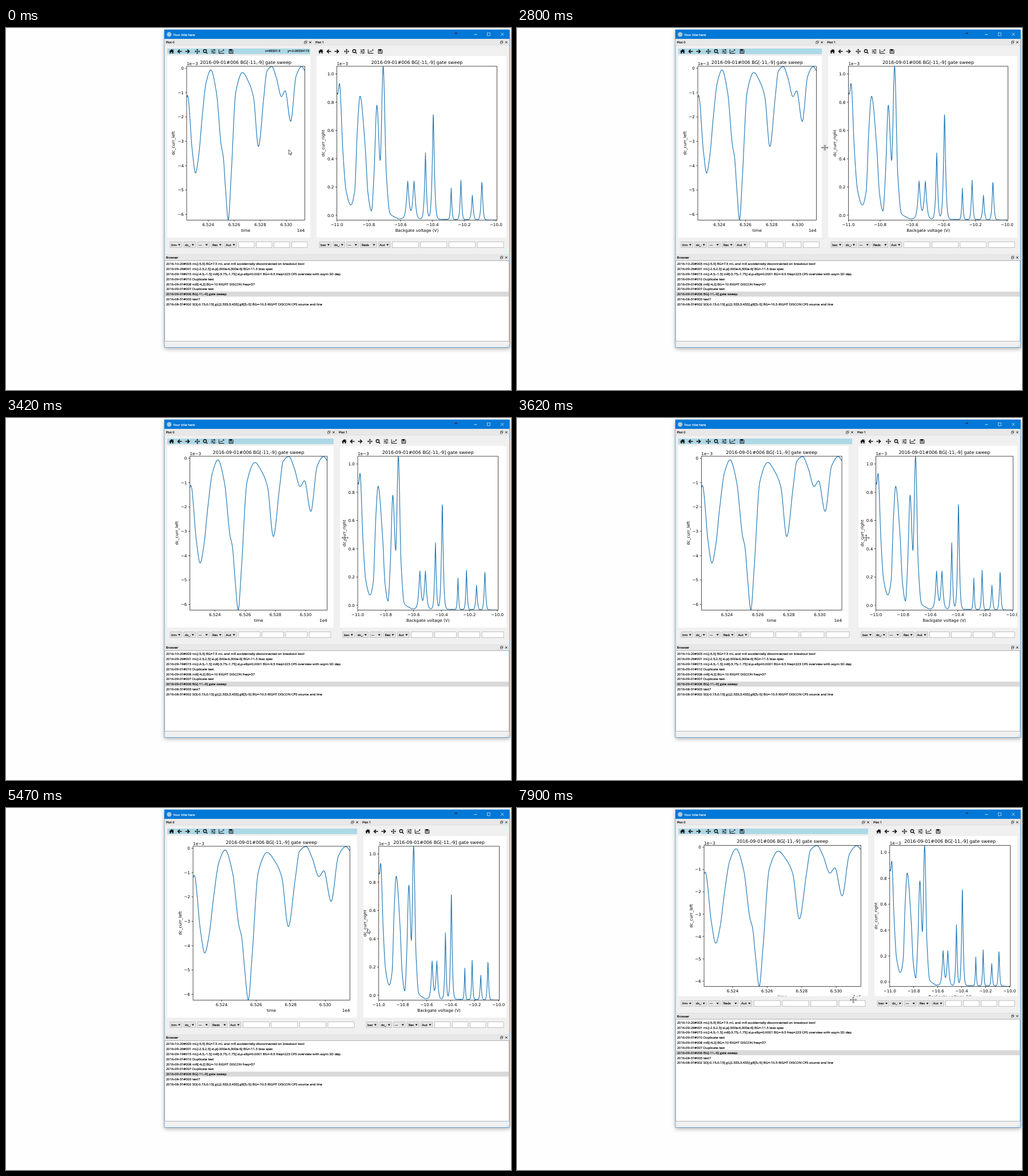
Recreate the animation shown at these times as an HTML page with a canvas. Size 883 px wide and 634 px high, loop 8000 ms.

```html
<!DOCTYPE html>
<html lang="en">
<head>
<meta charset="utf-8">
<title>Dock layout demo</title>
<style>
html, body { margin: 0; width: 100%; height: 100%; overflow: hidden; background: #fefefe; }
canvas { display: block; width: 883px; height: 634px; }
</style>
</head>
<body>
<canvas id="stage"></canvas>
<script>
const W = 883, H = 634, LOOP = 8000, TICK = 202;
const UI = '"Open Sans", "Noto Sans", sans-serif';
const MPL = '"DejaVu Sans", sans-serif';
const canvas = document.getElementById('stage');
const c = canvas.getContext('2d');
const dpr = window.devicePixelRatio || 1;
canvas.width = W * dpr;
canvas.height = H * dpr;

const clamp = (v, lo = 0, hi = 1) => Math.min(hi, Math.max(lo, v));
function ease(from, to, k) {
  const s = clamp((k - from) / (to - from));
  return s * s * (3 - 2 * s);
}

// Motion, with k counting screen refreshes
const split = k => Math.min(82, 83.7 * ease(12.35, 21.8, k));
const lift = k => 37.5 * clamp((k - 37) / 2);

// first tick, last tick, destination
const moves = [
  [4, 10, 538, 209.5], [12.75, 20.6, 635.5, 210], [22, 23, 632, 211],
  [27, 32, 568.5, 393], [32, 37, 586.5, 393], [37, 39, 588, 336]
];
const shapes = [[0, 'arrow'], [10, 'splitH'], [11, 'move'], [13, 'splitH'],
  [17, 'move'], [23, 'arrow'], [32, 'splitV'], [38, 'move']];

const cursorAt = k => moves.reduce(([x, y], [from, to, tx, ty]) => {
  const e = ease(from, to, k);
  return [x + (tx - x) * e, y + (ty - y) * e];
}, [494.5, 213]);

// Monotone cubic through a few knots, sampled every half pixel
function curveThrough(flat) {
  const xs = flat.filter((_, i) => i % 2 === 0), ys = flat.filter((_, i) => i % 2);
  const rise = i => (ys[i + 1] - ys[i]) / (xs[i + 1] - xs[i]);
  const slope = i => {
    if (i === 0 || i === xs.length - 1) return rise(Math.max(0, i - 1));
    const a = rise(i - 1), b = rise(i);
    return a * b > 0 ? 2 * a * b / (a + b) : 0;
  };
  const out = [];
  for (let i = 0; i < xs.length - 1; i++) {
    const d = xs[i + 1] - xs[i];
    for (let x = 0; x <= d; x += 0.5) {
      const s = x / d, q = 1 - s;
      out.push([xs[i] + x, q * q * (1 + 2 * s) * ys[i] + s * s * (3 - 2 * s) * ys[i + 1]
        + d * s * q * (q * slope(i) - s * slope(i + 1))]);
    }
  }
  return out;
}
const unit = (pts, w) => pts.map(([x, y]) => [x / w, (y - 67) / 269.5]);

const leftPts = curveThrough([
  0, 122, 2, 118, 13, 215, 20.5, 254, 28, 223, 35.8, 157, 45, 96, 56, 73.5,
  69, 113, 80, 205, 85, 226, 90, 280, 96.5, 336, 103, 262, 114, 112, 129.5, 78,
  144, 95, 155, 121, 166.5, 207.5, 179, 121, 186, 76, 197.5, 67.5, 208, 87,
  220, 120, 228.5, 110, 241.3, 163.5, 254, 84, 267, 67.5, 274, 75
]);
const rightPts = curveThrough([
  0, 113, 1.5, 116, 4.5, 97, 10.5, 215, 16, 284, 24.5, 310, 31, 287, 36, 175,
  40.5, 119.5, 49.5, 207, 54.5, 290, 60.5, 320.5, 65, 255, 70, 135, 75.8, 232,
  81, 67, 86.5, 255, 93, 325, 106, 333.5
]);
// Narrow peaks on a slowly falling base: position, height, width
const peaks = [
  [124, 66, 3], [135, 66, 3], [155, 116, 2.2], [168.7, 190, 2.5],
  [200, 55, 1.5], [217, 69, 1.8], [237, 43, 2], [253.7, 69, 2]
];
for (let x = 106.5; x <= 280; x += 0.5) {
  const base = 334 + (x - 106) * 0.014;
  rightPts.push([x, peaks.reduce(
    (y, [p, h, w]) => y - h * Math.exp(-Math.pow(Math.abs(x - p) / w, 1.3)), base)]);
}

const ticks = (from, step, labels) => labels.split(' ').map((s, i) => [s, from + i * step]);
const leftPlot = {
  l: 0.1357, r: 0.9615, curve: unit(leftPts, 274),
  xt: ticks(0.182, 0.2203, '6.524 6.526 6.528 6.530'),
  yt: ticks(0.013, 0.1583, '0 −1 −2 −3 −4 −5 −6'),
  xl: 'time', yl: 'dc_curr_left', xe: '1e4', yGap: 20.5
};
const rightPlot = {
  l: 0.107, r: 0.95, curve: unit(rightPts, 280),
  xt: ticks(0, 0.1989, '−11.0 −10.8 −10.6 −10.4 −10.2 −10.0'),
  yt: ticks(0.0501, 0.1837, '1.0 0.8 0.6 0.4 0.2 0.0'),
  xl: 'Backgate voltage (V)', yl: 'dc_curr_right', xe: '', yGap: 21.3
};

const rows = [
  '2016-10-20#003 mL[-5,5] BG=7.5 mL and mR accidentally disconnected on breakout box!',
  '2016-09-26#001 mL[-2.5,2.5] sLp[-300e-6,300e-6] BG=-11.5 bias spec',
  '2016-09-19#015 mL[-4.5,-1.5] mR[-3.75,-1.75] sLp-sRp=0.0001 BG=-9.5 freq=223 CPS overview with asym SD dep',
  '2016-09-01#010 Duplicate test',
  '2016-09-01#008 mR[-4,2] BG=-10 RIGHT DISCON freq=37',
  '2016-09-01#007 Duplicate test',
  '2016-09-01#006 BG[-11,-9] gate sweep',
  '2016-08-31#003 test7',
  '2016-08-31#002 SD[-0.15,0.15] gL[2.533,3.433] gR[5,-5] BG=-10.5 RIGHT DISCON CPS source and line'
];

// x offset, stroked path, line width, filled path
const icons = [
  [0, '', 1, 'M-4.5.3L0-4 1.8-2.3V-3.5H3V-1.1L4.5.3H3.2V3.6H1V1H-1V3.6H-3.2V.3Z'],
  [14, 'M4 0H-3M.2-3.1L-3 0 .2 3.1', 1.6, ''],
  [28, 'M-4 0H3M-.2-3.1L3 0-.2 3.1', 1.6, ''],
  [45, 'M-3.5 0H3.5M0-3.5V3.5', 0.9,
    'M-4.6 0l2.1-1.8v3.6zM4.6 0l-2.1-1.8v3.6zM0-4.6l-1.8 2.1h3.6zM0 4.6l-1.8-2.1h3.6z'],
  [59, 'M2-.6a2.6 2.6 0 1 1-5.2 0a2.6 2.6 0 1 1 5.2 0M1.3 1.3L3.7 3.7', 1.4, ''],
  [73, 'M-4-2.7H4M-4 0H4M-4 2.7H4', 0.8, 'M1-3.7h1.6v2H1zM-2.4-1h1.6v2h-1.6zM.4 1.7H2v2H.4z'],
  [87.3, 'M-4.5-3.6V3.4H4.7M-3 1.8L-1-.6 .6.8 4-2.8', 1, 'M4.5-3.6v2.6L1.9-3.6z'],
  [104, 'M-3.4-3.4H2.2L3.4-2.2V3.4H-3.4Z', 1, 'M-2.2-3.4H1.6V-.8H-2.2ZM-2.2.6H2.2V1.5H-2.2Z']
].map(([x, s, w, f]) => [x, new Path2D(s), w, new Path2D(f)]);

const sideHeads = 'M-3.8-1.7L-5.6 0-3.8 1.7M3.8-1.7L5.6 0 3.8 1.7';
const arrowPath = new Path2D('M0 0V8.6L1.9 6.9 3.2 9.9 4.5 9.3 3.2 6.4H5.8Z');
const movePath = new Path2D(sideHeads + 'M-5.5 0H5.5M0-5V5M-1.7-3.5L0-5.3 1.7-3.5M-1.7 3.5L0 5.3 1.7 3.5');
const splitPath = new Path2D(sideHeads + 'M-1-5V5M1-5V5M-5.6 0H-1M1 0H5.6');

function box(x, y, w, h, fill, edge) {
  if (fill) { c.fillStyle = fill; c.fillRect(x, y, w, h); }
  if (edge) { c.strokeStyle = edge; c.lineWidth = 0.6; c.strokeRect(x, y, w, h); }
}
function text(s, x, y, size, { font = UI, align = 'left', color = '#000' } = {}) {
  c.font = `${size}px ${font}`;
  c.textAlign = align;
  c.fillStyle = c.strokeStyle = color;
  c.fillText(s, x, y);
  if (font === UI) {
    c.lineWidth = 0.18;
    c.strokeText(s, x, y);
  }
}
function line(pts, color, width) {
  c.beginPath();
  pts.forEach(p => c.lineTo(...p));
  c.strokeStyle = color;
  c.lineWidth = width;
  c.stroke();
}
function clipped(x, y, w, h, draw) {
  c.save();
  c.beginPath();
  c.rect(x, y, w, h);
  c.clip();
  draw();
  c.restore();
}
function cross(x, y, r, color, width) {
  line([[x - r, y - r], [x + r, y + r]], color, width);
  line([[x - r, y + r], [x + r, y - r]], color, width);
}

function dockTitle(name, x0, x1, y) {
  box(x0, y - 5, x1 - x0, 10, '#e8e8e8', '#d4d4d4');
  text(name, x0 + 2, y + 2.1, 5.7);
  const rx = x1 - 13.5;
  box(rx - 1, y - 2.2, 3.3, 3, '', '#222');
  box(rx - 2.2, y - 0.6, 3.2, 2.8, '#f0f0f0', '#222');
  cross(x1 - 5.3, y, 1.8, '#222', 1);
}

function toolbar(x) {
  for (const [dx, stroke, width, fill] of icons) {
    c.save();
    c.translate(x + 7.5 + dx, 41);
    c.lineWidth = width;
    c.strokeStyle = c.fillStyle = '#111';
    c.stroke(stroke);
    c.fill(fill);
    c.restore();
  }
}

function plot(p, x, w, h) {
  const l = x + w * p.l, r = x + w * p.r, t = 49 + h * 0.0566, b = 49 + h * 0.904;
  const label = (s, lx, ly, align, size = 7.2) => text(s, lx, ly, size, { font: MPL, align });
  box(x, 49, w, h, '#fff');
  clipped(l, t, r - l, b - t, () => {
    c.lineJoin = 'round';
    line(p.curve.map(([u, v]) => [l + u * (r - l), t + v * (b - t)]), '#1f77b4', 1.15);
  });
  c.strokeStyle = '#000';
  c.lineWidth = 0.7;
  c.strokeRect(l, t, r - l, b - t);
  for (const [s, u] of p.xt) {
    const tx = l + u * (r - l);
    line([[tx, b], [tx, b + 2.6]], '#000', 0.7);
    label(s, tx, b + 10.3, 'center');
  }
  for (const [s, v] of p.yt) {
    const ty = t + v * (b - t);
    line([[l - 2.6, ty], [l, ty]], '#000', 0.7);
    label(s, l - 5.2, ty + 2.6, 'right');
  }
  label('1e−3', l, t - 1.8, 'left');
  label(p.xe, r, b + 20.1, 'right');
  label(p.xl, (l + r) / 2, b + 20.6, 'center');
  label('2016-09-01#006 BG[-11,-9] gate sweep', (l + r) / 2, t - 4.2, 'center', 7.95);
  c.save();
  c.translate(l - p.yGap, (t + b) / 2);
  c.rotate(-Math.PI / 2);
  label(p.yl, 0, 0, 'center');
  c.restore();
}

function controls(x, w, y, first) {
  const small = 20.4, gap = 3.5;
  const wide = small + Math.max(0, w - 295) * 0.21;
  const edit = (w - 10 - 4 * small - wide - 8 * gap) / 4;
  let cx = x + 5;
  for (const s of [first, 'dc_curr', '---', 'Reds', 'Auto']) {
    const cw = s === 'Reds' ? wide : small;
    box(cx, y, cw, 10, '#e6e6e6', '#a9a9a9');
    clipped(cx, y, cw - 9, 10, () => text(s, cx + 2, y + 7.2, 5.7));
    c.fillStyle = '#111';
    c.beginPath();
    c.moveTo(cx + cw - 6.6, y + 3.9);
    c.lineTo(cx + cw - 2.4, y + 3.9);
    c.lineTo(cx + cw - 4.5, y + 6.7);
    c.fill();
    cx += cw + gap;
  }
  for (let i = 0; i < 4; i++, cx += edit + gap) box(cx, y, edit, 10, '#fff', '#9a9a9a');
}

function frame() {
  box(0, 0, W, H, '#fefefe');
  c.save();
  c.shadowColor = 'rgba(0,0,0,.32)';
  c.shadowBlur = 7 * dpr;
  c.shadowOffsetY = 2 * dpr;
  box(277, 3, 603.5, 556.5, '#f0f0f0');
  c.restore();
  box(277, 3, 603.5, 556.5, '', '#2a82c8');
  box(277, 3, 603.5, 16, '#0078d7');
  c.fillStyle = '#a5cbe0';
  c.beginPath();
  c.arc(285.3, 11.2, 4, 0, 7);
  c.fill();
  text('Your title here', 292.3, 13.5, 5.8, { color: '#fff' });
  box(784.5, 8.3, 4.5, 1.7, '#3c2338');
  line([[818.3, 11.5], [823.5, 11.5]], '#fff', 0.7);
  box(841.5, 8.5, 5, 5, '', '#fff');
  cross(867.8, 11, 2.6, '#fff', 0.7);
}

function browser(up) {
  const y = 402 - up;
  dockTitle('Browser', 277.5, 880, y);
  box(277.7, y + 5.5, 602, 141 + up, '#fff', '#8a8e95');
  rows.forEach((s, i) => {
    const mid = y + 11.1 + i * 8.83;
    if (i === 6) box(278.2, mid - 4.4, 601, 8.8, '#d9d9d9');
    text(s, 279.7, mid + 2.1, 5.89);
  });
  for (let i = 0; i < 3; i++)
    for (let j = 0; j <= i; j++) box(878 - j * 1.6, 554.5 + i * 1.6, 0.8, 0.8, '#b5b5b5');
}

function coords(x, y) {
  const vx = 65223.5 + (x - 316) / 206.5 * 90.7;
  const vy = (70.5 - y) / 42650;
  text('x=' + vx.toFixed(1), 453, 41.8, 5.6);
  text('y=' + vy.toFixed(8), 530.3, 41.8, 5.6, { align: 'right' });
}

function cursor(shape, x, y) {
  c.save();
  c.translate(x, y);
  if (shape === 'arrow') {
    c.fillStyle = '#fff';
    c.fill(arrowPath);
    c.strokeStyle = '#222';
    c.lineWidth = 0.7;
    c.stroke(arrowPath);
  } else {
    if (shape === 'splitV') c.rotate(Math.PI / 2);
    const path = shape === 'move' ? movePath : splitPath;
    for (const [color, width] of [['#fff', 2.2], ['#333', 0.8]]) {
      c.strokeStyle = color;
      c.lineWidth = width;
      c.stroke(path);
    }
  }
  c.restore();
}

function render(t) {
  const k = Math.floor((t + 16) / TICK);
  const shift = split(k), up = lift(k);
  // Plots repaint a little later than the docks around them
  const wide = split(k - (k % 2 ? 0 : 0.5)), tall = 318 - lift(k - 0.58);
  const [mx, my] = cursorAt(k);
  const rx = 543 + shift;
  c.setTransform(dpr, 0, 0, dpr, 0, 0);
  frame();
  dockTitle('Plot 0', 277.5, 537.3 + shift, 25);
  dockTitle('Plot 1', 539 + shift, 880, 25);
  box(282, 36, 250 + shift, 9.8, '#add8e6');
  toolbar(282);
  toolbar(rx);
  if (mx < 522.5) coords(mx, my);
  clipped(282, 49, 250 + shift, 318 - up, () => plot(leftPlot, 282, 250 + wide, tall));
  clipped(rx, 49, 875 - rx, 318 - up, () => plot(rightPlot, rx, 332 - wide, tall));
  controls(282, 250 + shift, 374.7 - up, 'time');
  controls(rx, 332 - shift, 374.7 - up, 'backgate');
  browser(up);
  cursor(shapes.findLast(s => s[0] <= k)[1], mx, my);
}

const start = performance.now();
function tick() {
  render((performance.now() - start) % LOOP);
  requestAnimationFrame(tick);
}
tick();
</script>
</body>
</html>
```
